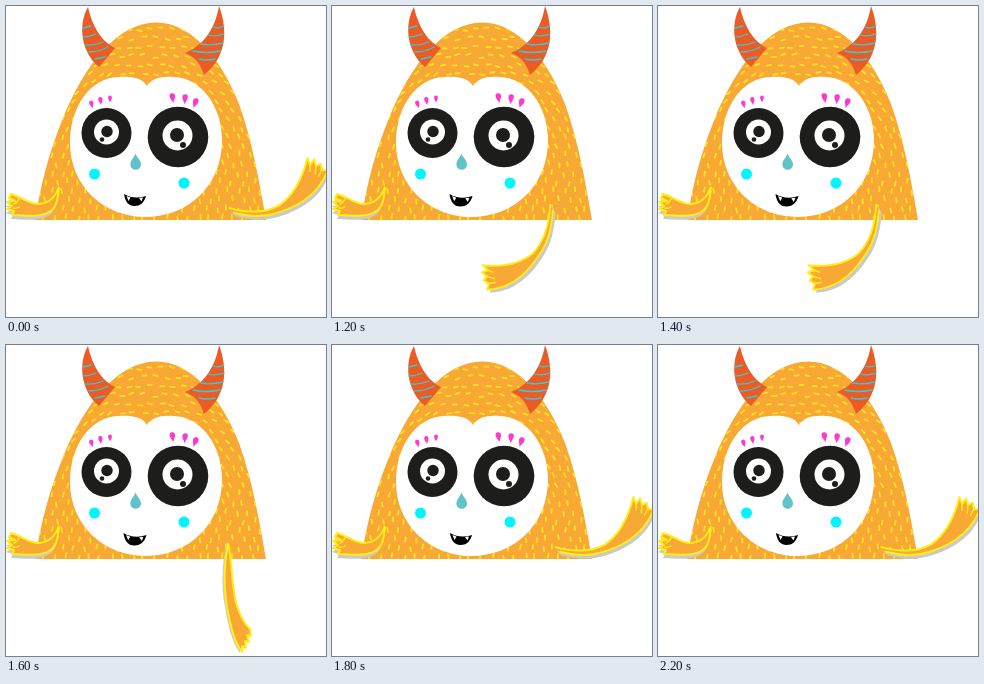
An HTML page that plays this animation: 320 by 311 pixels, repeating every 2.7 s.

```html
<!DOCTYPE html>
<html>
<head>
<meta charset="utf-8">
<style>
  html, body { margin: 0; height: 100%; overflow: hidden; background: #fff; }
  svg { display: block; width: 100vw; height: 100vh; }
  .line { fill: none; stroke-linecap: round; }
  .limb { fill: #f8a835; stroke: #ffee18; stroke-width: 2; stroke-linejoin: round; vector-effect: non-scaling-stroke; }
  .shade { fill: #c9c9c9; }
  .ink { fill: #1d1d1b; }
  .lash { fill: #ff38d2; }
</style>
</head>
<body>
<svg viewBox="0 0 320 311">
  <defs>
    <path id="armShape" d="M2-1C3 18 9 36 21 47C34 57 54 61 77 59L71 64L78 66L72 70L76 74L70 77L72 83C40 82 22 60 12 46C4 35 0 20-1 5"/>
    <path id="hangShape" d="M222 198C226 215 225 235 230 258C234 271 239 280 244 284L245 291L241 290L243 297L239 296L240 303L236 301L236 307C228 297 223 276 220 255C217 235 219 215 222 198"/>
    <path id="pawShape" d="M53 181C49 191 44 197 33 198C22 198 16 191 5 188L3 192L9 195L1 196L6 200L1 203L8 205L6 209C21 210 34 211 43 206C51 202 52 192 53 181"/>
    <path id="drop" d="M0 5C-1 2-2.400 1-2.400-1.400A2.400 2.400 0 0 1 2.400-1.400C2.400 1 1 2 0 5"/>
    <path id="dome" d="M29 214C35 178 43 146 57 112C79 58 112 16.500 150 16.500C188 16.500 217 57 233 98C247 137 254 180 260 214Z"/>
    <clipPath id="inside"><use href="#dome"/></clipPath>
  </defs>

  <use href="#dome" fill="#f8a835"/>
  <path id="fur" class="line" stroke="#ffe322" stroke-width="1.800" clip-path="url(#inside)"/>

  <g fill="#ea5b26">
    <path d="M82 1C73 16 73 44 93 61L109 42C96 36 86 20 82 1"/>
    <path d="M213 0C222 24 221 51 198 69C195 59 190 51 179 47C198 39 209 23 213 0"/>
  </g>
  <path class="line" stroke="#3cc9d0" stroke-width="1.300"
    d="M77 22L85 20M77 31Q83 31 90 28M79 39Q88 40 97 36M83 46Q93 46 102 41M89 53L99 51M207 21Q212 23 218 20M202 29Q209 31 218 28M195 38Q205 40 217 37M187 45Q200 48 214 45M193 53Q201 55 209 53"/>

  <path fill="#fff" d="M141 80C137 72 125 70 112 71C85 72 64 100 64 137C64 180 98 211 139 211C182 211 216 180 216 134C216 100 195 72 168 71C153 70 146 73 141 80"/>

  <g id="eyeL">
    <circle class="ink" cx="100.500" cy="127" r="25"/>
    <circle fill="#fff" cx="100.500" cy="126" r="12.500"/>
    <circle class="ink" cx="101" cy="125.500" r="5.700"/>
    <circle class="ink" cx="96" cy="133.500" r="2.300"/>
    <use href="#drop" class="lash" transform="translate(85.500 98) rotate(-15) scale(.9)"/>
    <use href="#drop" class="lash" transform="translate(94.500 94.500) rotate(-8) scale(.9)"/>
    <use href="#drop" class="lash" transform="translate(104 92.500) scale(.8)"/>
  </g>
  <g id="eyeR">
    <circle class="ink" cx="172" cy="131" r="30.300"/>
    <circle fill="#fff" cx="171.500" cy="129.500" r="15"/>
    <circle class="ink" cx="171" cy="129" r="7"/>
    <circle class="ink" cx="177" cy="139" r="3"/>
    <use href="#drop" class="lash" transform="translate(166.500 91.500) rotate(-8) scale(1.150)"/>
    <use href="#drop" class="lash" transform="translate(179 92.500) rotate(4) scale(1.150)"/>
    <use href="#drop" class="lash" transform="translate(189.300 96.500) rotate(18) scale(1.150)"/>
  </g>

  <path fill="#62c2ca" d="M129.500 147.500C131 152 135 154 135 158.500A5.300 5.300 0 0 1 124.400 158.500C124.400 154 128 152 129.500 147.500"/>
  <g fill="#00f5ff"><circle cx="88.500" cy="168" r="5.500"/><circle cx="178" cy="177" r="5.500"/></g>

  <g id="mouth">
    <path d="M118 188Q128 194 140 190C138 197 134 200 128.500 200C122 200 119 195 118 188"/>
    <path fill="#fff" d="M120.500 190L124.500 191.500L122.500 195ZM133 192L137 191.500L135.500 195.500Z"/>
  </g>

  <use href="#pawShape" class="shade" transform="translate(-1 4)"/>
  <use href="#pawShape" class="limb"/>
  <path class="line" stroke="#ffee18" stroke-width="1.500" d="M13 193Q11 197 8 198M13 201Q10 203 7 202"/>

  <g id="arm">
    <use href="#armShape" class="shade" transform="translate(-3 3)"/>
    <use href="#armShape" class="limb"/>
    <path class="line" stroke="#ffee18" stroke-width="1.500" d="M71 64L65 66M72 70L64 72M70 77L63 76"/>
  </g>
  <g id="hang">
    <use href="#hangShape" class="shade" transform="translate(-2 1)"/>
    <use href="#hangShape" class="limb"/>
  </g>
</svg>
<script>
  const $ = id => document.getElementById(id);

  // Fur: jittered strokes that follow the outline of the dome
  let seed = 7;
  const rand = () => (seed = seed * 16807 % 2147483647) / 2147483647;
  let fur = "";
  for (let y = 23, row = 0; y < 213; y += 9, row++) {
    for (let x = 34 + row % 2 * 5; x < 257; x += 11) {
      const px = x + rand() * 4 - 2, py = y + rand() * 4 - 2;
      const a = Math.atan2(Math.min(py - 165, 0), px - 145) + Math.PI / 2 + rand() * .5 - .25;
      const dx = 2 * Math.cos(a), dy = 2 * Math.sin(a);
      fur += `M${px - dx} ${py - dy}L${px + dx} ${py + dy}`;
    }
  }
  $("fur").setAttribute("d", fur);

  // The hanging arm has a shape of its own, the other poses share one
  const pose = {
    up: "translate(223 204) rotate(-71) scale(.97)",
    out: "translate(229 198)",
    across: "translate(220 199) scale(-.9 1.02)",
    far: "translate(220 199) rotate(32) scale(-.9 1.02)"
  };
  const swing = [[0, "up"], [1000, "out"], [1100, "hang"], [1200, "across"], [1300, "far"],
    [1400, "across"], [1600, "hang"], [1700, "out"], [1800, "up"]];
  const blink = [[0, 1], [1900, .55], [2000, .12], [2100, .55], [2200, 1]];
  const at = (keys, t) => keys.filter(k => k[0] <= t).pop()[1];

  const scaleAt = (x, y, sx, sy) =>
    `translate(${x} ${y}) scale(${sx} ${sy}) translate(${-x} ${-y})`;
  const show = (id, on) => $(id).setAttribute("visibility", on ? "visible" : "hidden");

  function draw(now) {
    const t = now % 2700;
    const name = at(swing, t), open = at(blink, t);
    const grin = name === "up" ? 1 : 1.05;
    show("hang", name === "hang");
    show("arm", name !== "hang");
    $("arm").setAttribute("transform", pose[name] || "");
    $("eyeL").setAttribute("transform", scaleAt(100.5, 131, 1, open));
    $("eyeR").setAttribute("transform", scaleAt(172, 136, 1, open));
    $("mouth").setAttribute("transform", scaleAt(129, 188, grin, grin));
  }

  const start = performance.now();
  function tick() {
    draw(performance.now() - start);
    requestAnimationFrame(tick);
  }
  tick();
</script>
</body>
</html>
```
